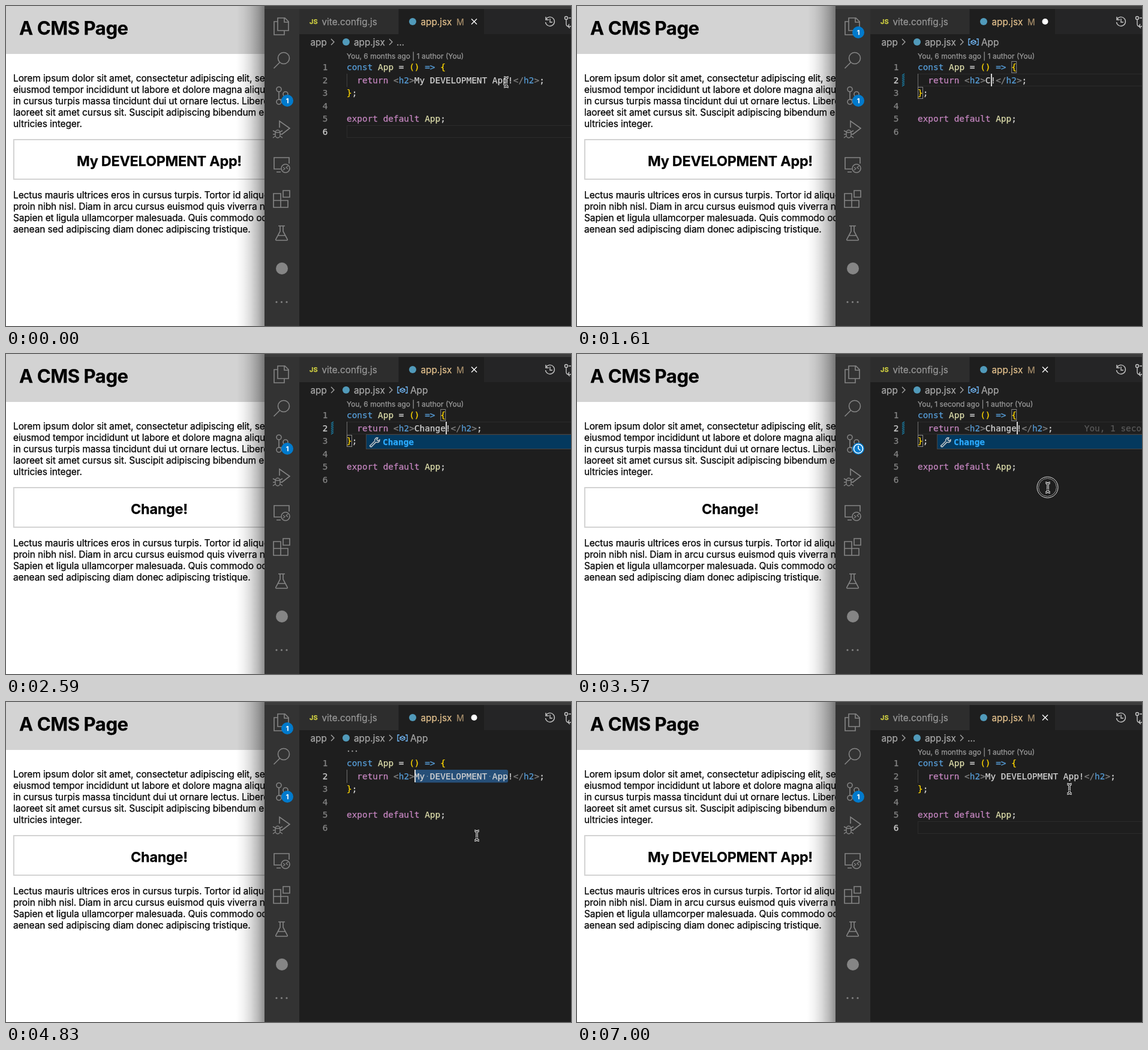
Animation, 942 px wide and 534 px high, one loop 7070 ms. Source, as an HTML page with a canvas:

```html
<!DOCTYPE html>
<html lang="en">
<head>
<meta charset="utf-8">
<title>Live editing</title>
<style>
  html, body { margin: 0; width: 100%; height: 100%; overflow: hidden; background: #fff; }
  canvas { display: block; }
</style>
</head>
<body>
<canvas id="stage" width="942" height="534"></canvas>
<script>
const ctx = document.getElementById('stage').getContext('2d');
const LOOP = 7070, STEP = 70;
const COL = 8.68, ROW = 21.6, CODE_X = 568;
const SANS = 'Inter, sans-serif', MONO = '14.4px "DejaVu Sans Mono", monospace';
const UI = '15.3px ' + SANS;
const GREY = '#858585', BLUE = '#569cd6', GOLD = '#ffd700', PINK = '#c586c0',
      CREAM = '#dcdcaa', LIGHT = '#d4d4d4', TAG = '#808080';
const FULL = 'My DEVELOPMENT App';

// Each track lists [start time, value]; the latest started value holds.
const tracks = {
  text: [[0, FULL], [1540, 'C'], [1750, 'Ch'], [1890, 'Cha'], [2030, 'Chan'], [2100, 'Chang'],
         [2170, 'Change'], [4200, 'C'], [4620, FULL]],
  line: [[0, 6], [140, 2], [3640, 6], [4200, 2], [6370, 6]],
  selection: [[0, 0], [770, 28], [980, 16], [1260, 13], [1540, 0], [4620, 13], [6370, 0]],
  caret: [[0, 0], [140, 1], [630, 0], [770, 1], [2660, 0], [3220, 1], [4130, 0], [4200, 1],
          [5110, 0], [5600, 1], [6160, 0], [6370, 1], [6860, 0]],
  symbol: [[0, 0], [280, 1], [3850, 0], [4480, 1], [6510, 0]],
  dirty: [[0, 0], [1540, 1], [2520, 0], [4200, 1], [5040, 0]],
  heading: [[0, FULL], [2590, 'Change'], [5110, FULL]],
  syncing: [[0, 0], [3500, 1], [3780, 0]],
  lens: [[0, '6 months'], [3220, '1 second'], [4760, ''], [5600, '6 months']],
  popup: [[0, 0], [2380, 1], [3640, 0]],
  changed: [[0, 0], [1540, 1], [4620, 0]],
  blame: [[0, 0], [3220, 1], [3640, 0]],
  ring: [[0, 0], [70, 1], [140, 0], [3500, 1], [3640, 0], [6300, 1], [6370, 0]],
};

const stateAt = t => Object.fromEntries(Object.entries(tracks).map(
  ([name, track]) => [name, track.filter(([start]) => start <= t).pop()[1]]));

function pointerAt(t) {
  if (t < 770) return [834, 127];
  if (t < 2870) return null;
  if (t < 2940) return [799, 173];
  const k = Math.max(0, (t - 6720) / 280);
  return [785 + 36 * k, 223 - 78 * k];
}

function rect(x, y, w, h, color) {
  ctx.fillStyle = color;
  ctx.fillRect(x, y, w, h);
}
function frame(x, y, w, h, color, width = 1) {
  ctx.strokeStyle = color;
  ctx.lineWidth = width;
  ctx.strokeRect(x, y, w, h);
}
function disc(x, y, r, color) {
  ctx.fillStyle = color;
  ctx.beginPath();
  ctx.arc(x, y, r, 0, 7);
  ctx.fill();
}
function circle(x, y, r, color, width = 1.6) {
  ctx.strokeStyle = color;
  ctx.lineWidth = width;
  ctx.beginPath();
  ctx.arc(x, y, r, 0, 7);
  ctx.stroke();
}
function line(d, color = GREY, width = 1.6) {
  ctx.strokeStyle = color;
  ctx.lineWidth = width;
  ctx.stroke(new Path2D(d));
}
// A hairline outline gives the slightly heavy look of smoothed text.
function text(str, x, y, font, color, align = 'left', spacing = '0px') {
  ctx.font = font;
  ctx.fillStyle = ctx.strokeStyle = color;
  ctx.lineWidth = 0.25;
  ctx.textAlign = align;
  ctx.letterSpacing = spacing;
  ctx.fillText(str, x, y);
  ctx.strokeText(str, x, y);
}
function dots(x, y, gap, r, color) {
  for (let i = 0; i < 3; i++) disc(x + i * gap, y, r, color);
}
const colX = col => CODE_X + col * COL;
const baseline = row => 107 + (row - 1) * ROW;

// Draws [text, colour] pairs one after the other on a code row.
function code(row, col, ...parts) {
  for (const [str, color] of parts) {
    text(str, colX(col), baseline(row), MONO, color);
    col += str.length;
  }
}

function page(s) {
  rect(0, 0, 432, 534, '#fff');
  rect(0, 0, 432, 80, '#d3d3d3');
  text('A CMS Page', 22, 48, 'bold 31px ' + SANS, '#000', 'left', '-0.4px');
  const paragraph = (y, lines) => lines.forEach((str, i) =>
    text(str, 12, y + i * 19, '15.5px ' + SANS, '#000', 'left', '-0.11px'));
  paragraph(126, [
    'Lorem ipsum dolor sit amet, consectetur adipiscing elit, sed do',
    'eiusmod tempor incididunt ut labore et dolore magna aliqua.',
    'in cursus turpis massa tincidunt dui ut ornare lectus. Libero',
    'laoreet sit amet cursus sit. Suscipit adipiscing bibendum est',
    'ultricies integer.']);
  paragraph(321, [
    'Lectus mauris ultrices eros in cursus turpis. Tortor id aliquet',
    'proin nibh nisl. Diam in arcu cursus euismod quis viverra nibh.',
    'Sapien et ligula ullamcorper malesuada. Quis commodo odio',
    'aenean sed adipiscing diam donec adipiscing tristique.']);
  frame(13, 223, 485, 66, '#d3d3d3', 2);
  text(s.heading + '!', 255.5, 267, 'bold 23.3px ' + SANS, '#000', 'center', '-0.2px');

  const shadow = ctx.createLinearGradient(384, 0, 432, 0);
  [0, 0.05, 0.14, 0.27, 0.45].forEach((a, i) => shadow.addColorStop(i / 4, `rgba(0,0,0,${a})`));
  rect(384, 0, 48, 534, shadow);
}

function badge(x, y, clock) {
  disc(x, y, 10, '#007acc');
  if (clock) {
    circle(x, y, 7.5, '#fff');
    line(`M${x} ${y - 5}v5l3.5 3`, '#fff');
  } else {
    text('1', x, y + 4, 'bold 11px ' + SANS, '#fff', 'center');
  }
}

function activityBar(s) {
  rect(431, 5, 58, 529, '#333');
  line('M453 41V20h12l6 6v15zM464 20v7h7M453 26h-6v22h17v-7');
  circle(463, 87, 9.5, GREY);
  line('M456.500 94l-10 10');
  circle(455, 139, 4, GREY);
  circle(466, 147, 4, GREY);
  circle(455, 160, 4, GREY);
  line('M455 143v13M466 151c0 4-3 5-11 5');
  line('M456 203v-11l17 12-13 10');
  line('M449 212a4 5 0 0 1 8 0v3a4 5 0 0 1-8 0zM449 211h8M445 208l4 2M445 214h4M445 220l4-3M461 208l-4 2M461 214h-4M461 220l-4-3', GREY, 1.4);
  line('M458 272h-11v-19h25v10M451 277h7');
  circle(466, 271, 7, GREY);
  line('M462 269l3 2.5-3 2.5M470 267l-3 2.5 3 2.5', GREY, 1.2);
  line('M446 313h12v23h-12zM446 324.500h24v11.500h-12M470 336v-11.500M462 308h11v11h-11z');
  line('M454 367h11M457 367v9l-7 13q-1 2 1 2h17q2 0 1-2l-7-13v-9M453 383h13');
  disc(460, 438, 10, GREY);
  dots(451, 494, 8.5, 1.6, GREY);
  if (s.dirty) badge(469, 44);
  badge(469, 158, s.syncing);
}

function tabs(s) {
  rect(431, 0, 511, 5, '#3c3c3c');
  rect(489, 5, 453, 42, '#252526');
  rect(489, 5, 165, 42, '#2d2d2d');
  rect(655, 5, 142, 42, '#1e1e1e');
  text('JS', 506, 30, 'bold 11px ' + SANS, '#cbcb41');
  text('vite.config.js', 526.5, 31.5, UI, '#969696');
  disc(678, 26, 6, '#519aba');
  text('app.jsx', 691.5, 31.5, UI, '#e2c08d');
  text('M', 751, 31.5, '14px ' + SANS, '#a98f6b');
  if (s.dirty) disc(780.5, 26, 5, '#fff');
  else line('M776 21.500l9 9M785 21.500l-9 9', '#fff', 1.4);
  line('M900.500 22a7.500 7.500 0 1 1-1 5M900 18v5h5M907 21v6h4', '#c5c5c5', 1.4);
  circle(934, 20, 2.5, '#c5c5c5', 1.4);
  line('M934 23v7q0 4 4 4h5M939 30l-2 4 3 3M938 20h5', '#c5c5c5', 1.4);
}

function breadcrumbs(s) {
  const grey = '#a9a9a9';
  text('app', 507.5, 65.5, UI, grey);
  line('M542 55l5 5-5 5M639 55l5 5-5 5', grey, 1.3);
  disc(567, 60, 6, '#519aba');
  text('app.jsx', 580, 65.5, UI, grey);
  if (s.symbol) {
    line('M656 55h-3v10h3M666 55h3v10h-3M657 59l4-2 4 2v3l-4 2-4-2zM657 59l4 2 4-2', '#75beff', 1.3);
    text('App', 674, 65.5, UI, grey);
  } else {
    text('...', 651, 65.5, UI, grey);
  }
}

function editor(s) {
  rect(489, 47, 453, 487, '#1e1e1e');
  breadcrumbs(s);
  if (s.lens) text(`You, ${s.lens} ago | 1 author (You)`, 568, 87.5, '12px ' + SANS, '#999');
  else dots(571, 82, 6.5, 1.2, '#999');

  const top = baseline(s.line) - 15.6;
  const inCode = s.line === 2;
  if (!s.selection) frame(568.5, Math.round(top) + 0.5, 400, 20, '#2b2b2b');
  for (let row = 1; row <= 6; row++)
    text(row, 536.5, baseline(row), MONO, row === s.line ? '#d0d0d0' : GREY, 'right');
  if (s.changed)
    for (let y = 113; y < 133; y += 3) line(`M542 ${y + 3}l4-3`, '#1b81a8', 1.5);

  rect(568, 113, 1, 22, inCode ? '#707070' : '#404040');
  if (s.selection) {
    ctx.fillStyle = '#264f78';
    ctx.beginPath();
    ctx.roundRect(colX(s.selection), 113, (31 - s.selection) * COL, 21.5, 3);
    ctx.fill();
    for (const space of [15, 27])
      if (space >= s.selection) disc(colX(space + 0.5), 124, 0.9, '#7d93aa');
  }
  if (inCode && !s.selection) {
    frame(colX(18) + 0.5, 92.5, 8, 19, '#888');
    frame(568.5, 135.5, 8, 19, '#888');
  }

  code(1, 0, ['const ', BLUE], ['App', CREAM], [' = ', LIGHT], ['()', GOLD], [' => ', BLUE], ['{', GOLD]);
  code(2, 2, ['return ', PINK], ['<', TAG], ['h2', BLUE], ['>', TAG], [s.text + '!', LIGHT],
       ['</', TAG], ['h2', BLUE], ['>', TAG], [';', LIGHT]);
  code(3, 0, ['}', GOLD], [';', LIGHT]);
  code(5, 0, ['export default ', PINK], ['App', CREAM], [';', LIGHT]);
  if (s.blame) code(2, 32, ['You, 1 second ago', '#595959']);

  if (s.caret) {
    const col = inCode ? s.selection || 13 + s.text.length : 0;
    rect(Math.round(colX(col)), top, 2, 21, '#d8d8d8');
  }
  if (s.popup) {
    rect(601, 135, 341, 23, '#04395e');
    frame(600.5, 134.5, 345, 24, '#454545');
    line('M607 153l8-8M615 145a4 4 0 0 1 5-5l-2 3 2 2 3-2a4 4 0 0 1-6 4l-8 8q-3 0-2-3', '#d0d0d0', 1.4);
    text('Change', 628, 151.5, 'bold ' + MONO, '#2aaaff');
  }
}

function pointer(at, ring) {
  if (!at) return;
  const [x, y] = at;
  if (ring) {
    circle(x - 0.5, y - 0.5, 17.5, '#ddd', 1);
    circle(x - 0.5, y - 0.5, 15, '#999', 1);
  }
  const beam = `M${x - 4} ${y - 8}q4 0 4 3v10q0 3-4 3M${x + 4} ${y - 8}q-4 0-4 3v10q0 3 4 3M${x - 2} ${y + 3}h4`;
  line(beam, '#e8e8e8', 3.4);
  line(beam, '#111', 1.2);
}

function draw(now) {
  const t = Math.floor(now % LOOP / STEP) * STEP;
  const s = stateAt(t);
  page(s);
  editor(s);
  tabs(s);
  activityBar(s);
  pointer(pointerAt(t), s.ring);
  requestAnimationFrame(draw);
}
requestAnimationFrame(draw);
</script>
</body>
</html>
```
